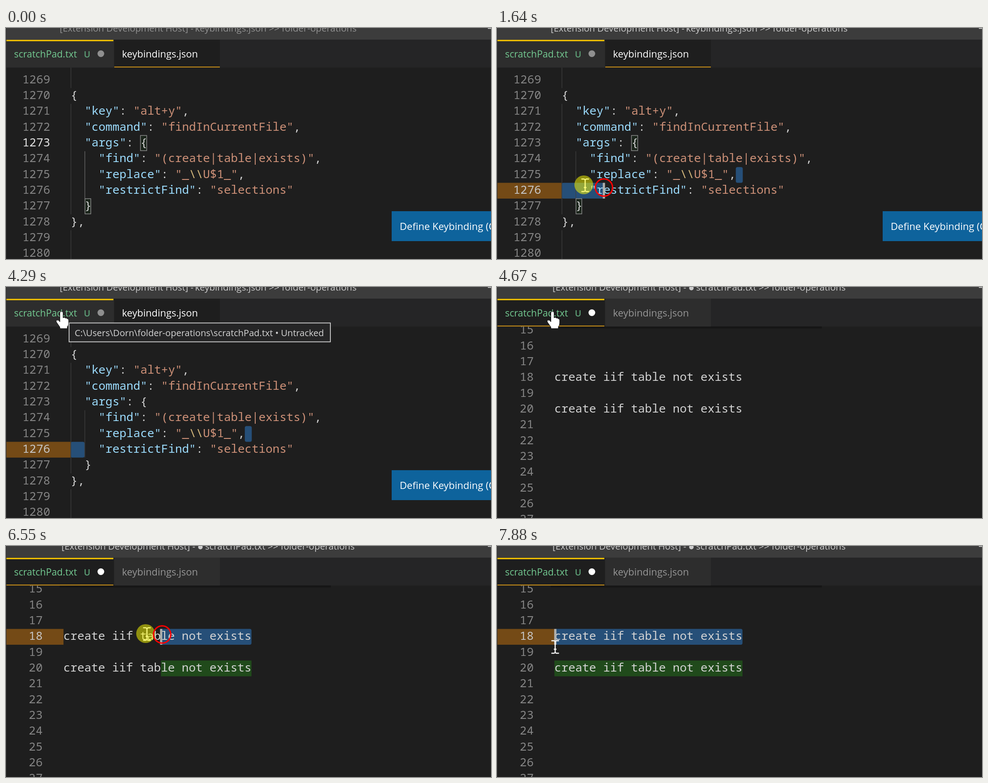
An HTML page that plays this animation: 1084 by 517 pixels, repeating every 8000 ms.

```html
<!DOCTYPE html>
<html lang="en">
<head>
<meta charset="utf-8">
<title>Editor demo</title>
<style>
  html, body { margin: 0; width: 100%; height: 100%; overflow: hidden; background: #1e1e1e; }
  svg { display: block; width: 1084px; height: 517px; }
  text { white-space: pre; }
  .ui { font-family: "Open Sans", "Noto Sans", sans-serif; }
  .code { font-family: "Noto Sans Mono", "DejaVu Sans Mono", monospace; font-size: 25.95px; fill: #d4d4d4; }
  .num { fill: #858585; }
  .key { fill: #9cdcfe; }
  .str { fill: #ce9178; }
  .esc { fill: #d7ba7d; }
  .sel { fill: #264f78; }
  .same { fill: #204a1b; }
  .gutter { fill: #744a16; }
  .caret { fill: #aeafad; }
  .guide { fill: #404040; }
  .match { fill: rgba(0, 100, 0, .1); stroke: #909090; stroke-width: 1.4; }
  .hide { display: none; }
</style>
</head>
<body>
<svg id="stage" viewBox="0 0 1084 517"></svg>
<script>
const LOOP = 8000, CHAR = 15.57, ROW = 35.34, BASELINE = 24.6;
const SWITCH = 4600;
const json = { x: 144.5, top: 99.1, first: 1269 };
const pad = { x: 128.3, top: 79.6, first: 15 };

const colX = (doc, col) => doc.x + col * CHAR;
const rowY = (doc, line) => doc.top + (line - doc.first) * ROW;

// Markup helpers
const rect = (x, y, w, h, attrs = '') =>
  `<rect x="${x}" y="${y}" width="${w}" height="${h}" ${attrs}/>`;
const label = (x, y, size, fill, str, attrs = '') =>
  `<text class="ui" x="${x}" y="${y}" font-size="${size}" fill="${fill}" ${attrs}>${str}</text>`;
const code = (doc, line, col, str) =>
  `<text class="code" x="${colX(doc, col)}" y="${rowY(doc, line) + BASELINE}">${str}</text>`;
const span = (cls, str) => `<tspan class="${cls}">${str}</tspan>`;
const key = str => span('key', `"${str}"`);
const str = s => span('str', `"${s}"`);
const guide = (doc, col, from, to, attrs = '') =>
  rect(colX(doc, col), rowY(doc, from), 1.2, (to - from + 1) * ROW, `class="guide" ${attrs}`);

function numbers(doc, last, right, id) {
  let out = '';
  for (let n = doc.first; n <= last; n++) {
    out += `<text id="${id}${n}" class="code num" text-anchor="end" x="${right}" y="${rowY(doc, n) + BASELINE}">${n}</text>`;
  }
  return out;
}

const jsonView = `
  ${rect(1, 0, 143.5, ROW, 'id="jGutter" class="gutter"')}
  ${rect(colX(json, 25), rowY(json, 1275), CHAR, ROW, 'id="jEol" class="sel" rx="4"')}
  ${rect(json.x, rowY(json, 1276), 0, ROW, 'id="jSel" class="sel" rx="4"')}
  ${guide(json, 0, 1268, 1269)}${guide(json, 0, 1271, 1277)}${guide(json, 0, 1279, 1281)}
  ${guide(json, 2, 1274, 1276, 'id="jGuide"')}
  <g id="jMatch">
    ${rect(300.5, 240.5, 14, 34, 'class="match"')}
    ${rect(176.5, 382, 13, 34, 'class="match"')}
  </g>
  ${numbers(json, 1280, 98.8, 'j')}
  ${code(json, 1270, 0, '{')}
  ${code(json, 1271, 2, `${key('key')}: ${str('alt+y')},`)}
  ${code(json, 1272, 2, `${key('command')}: ${str('findInCurrentFile')},`)}
  ${code(json, 1273, 2, `${key('args')}: {`)}
  ${code(json, 1274, 4, `${key('find')}: ${str('(create|table|exists)')},`)}
  ${code(json, 1275, 4, `${key('replace')}: ${span('str', '"_')}${span('esc', '\\\\')}${span('str', 'U$1_"')},`)}
  ${code(json, 1276, 4, `${key('restrictFind')}: ${str('selections')}`)}
  ${code(json, 1277, 2, '}')}
  ${code(json, 1278, 0, '},')}
  ${rect(0, 0, 5, ROW, 'id="jCaret" class="caret"')}
  ${rect(862, 410, 222, 67, 'fill="#0e639c"')}
  ${label(880, 452, 22, '#fff', 'Define Keybinding (Ctrl+K Ctrl+K)')}
  ${rect(0, 26, 1084, 62.5, 'fill="#252526"')}
  ${rect(0, 26, 241, 62.5, 'fill="#2d2d2d"')}
  ${rect(242, 26, 236, 62.5, 'fill="#1e1e1e"')}
  ${rect(242, 86.5, 236, 1.7, 'fill="#e8a317"')}
  ${label(259.3, 66.3, 21.9, '#fff', 'keybindings.json')}
  <circle cx="212" cy="57.5" r="7.5" fill="#8f8f8f"/>
  ${rect(0, 0, 1084, 26, 'fill="#3c3c3c"')}
  <g id="jTitle">
    ${label(120, 8.3, 20.3, 'inherit', '[Extension Development Host] -')}
    ${label(422.5, 8.3, 20.6, 'inherit', 'keybindings.json &gt;&gt; folder-operations')}
  </g>`;

const phrase = 'create iif table not exists';
const padView = `
  ${rect(1, rowY(pad, 18), 127.5, ROW, 'id="pGutter" class="gutter"')}
  ${rect(0, rowY(pad, 18), 0, ROW, 'id="pSel" class="sel" rx="4"')}
  ${rect(0, rowY(pad, 20), 0, ROW, 'id="pSame" class="same"')}
  ${numbers(pad, 27, 82, 'p')}
  ${code(pad, 18, 0, phrase)}${code(pad, 20, 0, phrase)}
  ${rect(0, rowY(pad, 18), 5, ROW, 'id="pCaret" class="caret"')}
  ${rect(120, 88, 606, 7, 'fill="url(#shade)"')}
  ${rect(0, 26, 1084, 62.5, 'fill="#252526"')}
  ${rect(0, 26, 241, 62.5, 'fill="#1e1e1e"')}
  ${rect(242, 26, 236, 62.5, 'fill="#2d2d2d"')}
  ${rect(0, 86.5, 240, 1.7, 'fill="#e8a317"')}
  ${label(259.3, 66.3, 21.9, '#969696', 'keybindings.json')}
  <circle cx="212" cy="57.5" r="7.5" fill="#fff"/>
  ${rect(0, 0, 1084, 26, 'fill="#3c3c3c"')}
  ${label(124, 8.3, 20.3, '#ccc', '[Extension Development Host] -')}
  <circle cx="434.5" cy="2.5" r="5" fill="#ccc"/>
  ${label(445, 8.3, 20.4, '#ccc', 'scratchPad.txt &gt;&gt; folder-operations')}`;

document.getElementById('stage').innerHTML = `
  <defs><linearGradient id="shade" x2="0" y2="1">
    <stop offset="0" stop-opacity=".45"/><stop offset="1" stop-opacity="0"/>
  </linearGradient></defs>
  ${rect(0, 0, 1084, 517, 'fill="#1e1e1e"')}
  <g id="jsonView">${jsonView}</g>
  <g id="padView">${padView}</g>
  ${rect(0, 26.5, 240, 3, 'fill="#ffcc00"')}
  ${label(18, 66.3, 21.3, '#73c991', 'scratchPad.txt')}
  ${label(174, 66, 19.5, '#5da077', 'U', 'font-weight="600"')}
  ${rect(1077, 0, 7, 2, 'fill="#bbb"')}
  ${rect(0, 0, 1, 517, 'fill="#2b2b2b"')}
  <g id="tip">
    ${rect(141, 80.5, 584, 42.2, 'fill="#252526" stroke="#d0d0d0" stroke-width="1.8"')}
    ${label(153.5, 109.7, 20.06, '#d4d4d4', 'C:\\Users\\Dorn\\folder-operations\\scratchPad.txt • Untracked')}
  </g>
  <path id="beam" fill="none" stroke="#f4f4f4" stroke-width="2.6"
    d="M-8.5-14H-2.5L0-12.5 2.5-14H8.5M0-13V13M-8.5 14H-2.5L0 12.5 2.5 14H8.5M-3 5H3"/>
  <path id="hand" fill="#fff" stroke="#111" stroke-width="1"
    d="M-3.5 2a3.5 3.5 0 0 1 7 0V13q3.5-2 4.5 .5 4-1 4.5 1.5 3.5-.5 3.5 3v7q0 5-3 8v4H-3l-1-4-7-10q-2-4 1-5 3-1 6.5 4z"/>
  <circle id="glow" r="21" fill="#ff0" fill-opacity=".5"/>
  <circle id="ring" r="19.3" fill="none" stroke="#f00" stroke-width="3"/>`;

const el = {};
document.querySelectorAll('[id]').forEach(node => { el[node.id] = node; });
const show = (node, on) => node.classList.toggle('hide', !on);
const place = (node, x, y) => node.setAttribute('transform', `translate(${x} ${y})`);
const setX = (node, x, w) => { node.setAttribute('x', x); if (w !== undefined) node.setAttribute('width', w); };

// Pointer positions: evenly spaced steps within each run
const moves = [];
function run(from, to, points) {
  points.forEach(([x, y], i) => {
    const t = from + (to - from) * i / Math.max(1, points.length - 1);
    moves.push({ t: Math.floor(t / 10) * 10, x, y });
  });
}
run(220, 620, [[643, 347], [644, 362], [644, 388], [645, 415], [645, 435], [645, 444]]);
run(1120, 1790, [[646, 400], [642, 343], [640, 343], [580, 348], [450, 354],
  [330, 357], [239, 357], [197, 352], [178, 351], [178, 351]]);
run(2190, 2420, [[200, 360], [320, 395], [430, 418], [483, 427]]);
run(2590, 2590, [[485, 427]]);
run(2740, 2740, [[487, 426]]);
run(2960, 3510, [[478, 412], [435, 360], [365, 280], [285, 195], [210, 120], [160, 72], [134, 52], [126, 47]]);
run(3670, 3750, [[125, 50], [124, 56]]);
run(4910, 5700, [[128, 64], [150, 92], [230, 150], [330, 210], [430, 250],
  [500, 268], [535, 268], [550, 257], [552, 245], [553, 230], [555, 217]]);
run(5850, 6000, [[555, 212], [555, 206], [555, 201]]);
run(6310, 7000, [[556, 196], [470, 198], [349, 198], [315, 197], [280, 198],
  [245, 200], [210, 202], [170, 204], [128, 207], [126, 207]]);
run(7240, 7500, [[127, 212], [128, 220], [129, 226], [130, 226]]);

const drags = [{ from: 1190, to: 2190 }, { from: 6310, to: 7240 }];
const tabClick = { from: 4530, to: 4660 };
const within = (t, span) => t >= span.from && t < span.to;
const moveIndex = t => moves.findLastIndex(m => m.t <= t);

// The selection trails the pointer by one step
function trail(t, drag) {
  const i = moveIndex(Math.min(t, drag.to - 1));
  return moves[i - 1].t < drag.from ? moves[i] : moves[i - 1];
}
const caretCol = (doc, x, max) => Math.max(0, Math.min(max, Math.round((x - doc.x) / CHAR)));
const blink = (t, start) => t < start || Math.floor((t - start) / 500) % 2 === 0;

function drawJson(t) {
  const active = t >= drags[0].from;
  const tail = active && trail(t, drags[0]);
  const line = !active ? 1273 : tail.y < rowY(json, 1276) ? 1275 : 1276;
  const selected = line === 1276;
  const col = selected ? caretCol(json, tail.x, 32) : 25;
  for (const n of [1273, 1275, 1276]) {
    el['j' + n].style.fill = n !== line ? '' : active ? '#c6c6c6' : '#e4e4e4';
  }
  el.jTitle.setAttribute('fill', active ? '#ccc' : '#929292');
  el.jGuide.style.fill = active ? '' : '#707070';
  show(el.jMatch, t < 1790);
  show(el.jGutter, active);
  show(el.jEol, selected);
  show(el.jSel, selected);
  show(el.jCaret, active && blink(t, 1740));
  el.jGutter.setAttribute('y', rowY(json, line));
  el.jCaret.setAttribute('y', rowY(json, line));
  setX(el.jSel, json.x, col * CHAR);
  setX(el.jCaret, colX(json, col) - 1.5);
}

function drawPad(t) {
  const active = t >= drags[1].from;
  const col = active ? caretCol(pad, trail(t, drags[1]).x, phrase.length) : phrase.length;
  const x = colX(pad, col), width = (phrase.length - col) * CHAR;
  el.p18.style.fill = active ? '#c6c6c6' : '';
  show(el.pGutter, active);
  show(el.pCaret, active && blink(t, 6880));
  setX(el.pSel, x, width);
  setX(el.pSame, x, width);
  setX(el.pCaret, x - (col ? 2 : 0.5));
}

function drawPointer(t) {
  const at = moves[moveIndex(t)];
  const drag = drags.find(d => within(t, d));
  const overTab = at && at.y < 88;
  show(el.beam, at && !overTab);
  show(el.hand, overTab);
  show(el.glow, drag || within(t, tabClick));
  show(el.ring, drag);
  if (!at) return;
  place(overTab ? el.hand : el.beam, at.x, at.y);
  place(el.glow, at.x - 3, at.y - 1);
  if (drag) {
    const tail = trail(t, drag);
    place(el.ring, tail.x, tail.y);
  }
}

function draw(t) {
  const first = t < SWITCH;
  show(el.jsonView, first);
  show(el.padView, !first);
  show(el.tip, t >= 4210 && first);
  (first ? drawJson : drawPad)(t);
  drawPointer(t);
}

const start = performance.now();
function tick() {
  draw((performance.now() - start) % LOOP);
  requestAnimationFrame(tick);
}
tick();
</script>
</body>
</html>
```
